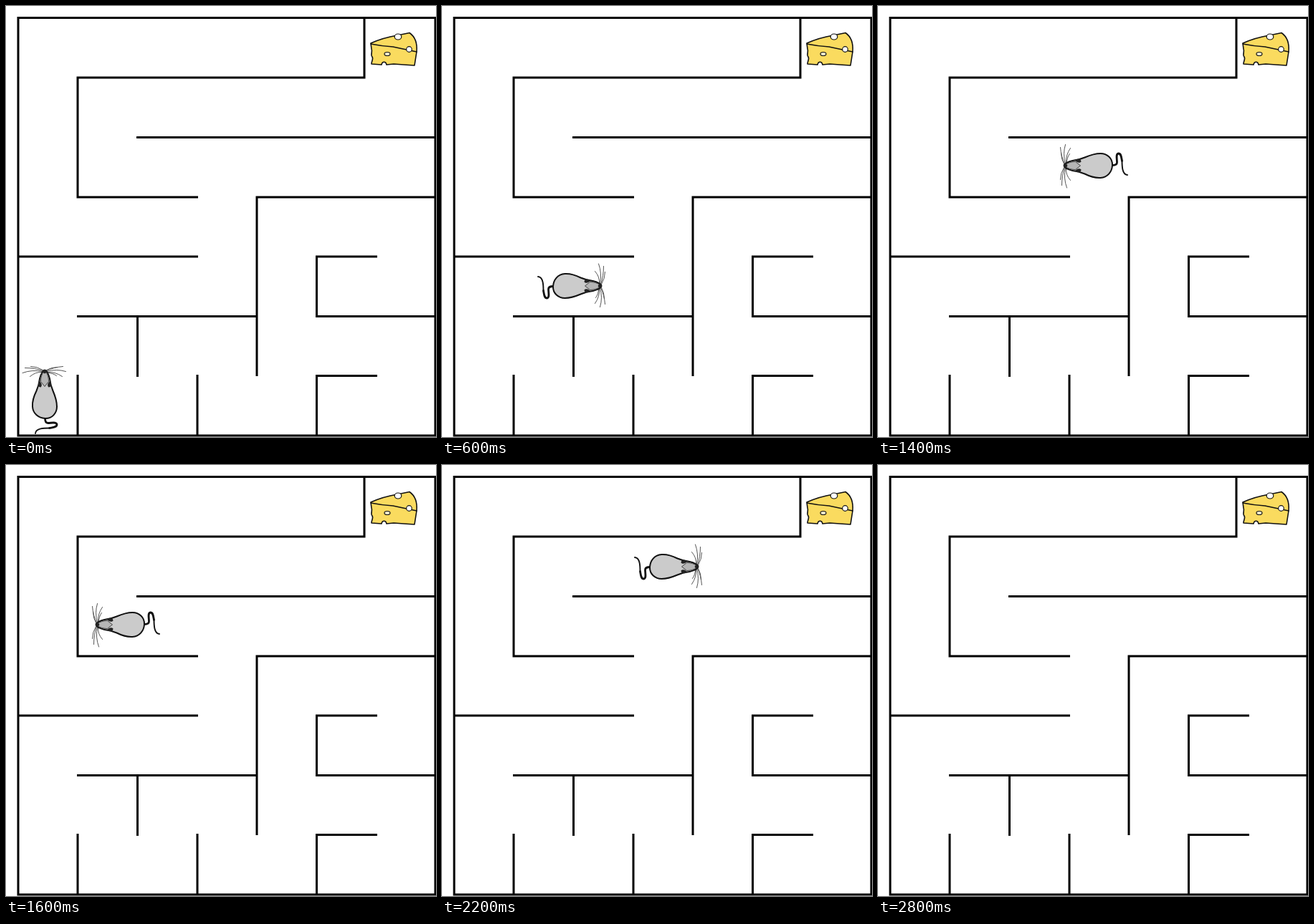
These frames come from a looping animation (600x602 px, 2900 ms). An HTML page with a canvas:

```html
<!DOCTYPE html>
<html lang="en">
<head>
<meta charset="utf-8">
<title>Mouse in a maze</title>
<style>
html, body { margin: 0; width: 100%; height: 100%; overflow: hidden; background: #fff; }
canvas { display: block; }
</style>
</head>
<body>
<canvas id="stage" width="600" height="602"></canvas>
<script>
const ctx = document.getElementById('stage').getContext('2d');
const STEP = 200, LOOP = 2900;
const UP = 0, RIGHT = Math.PI / 2, LEFT = -Math.PI / 2;

// Centre and heading of the mouse at each step; it is gone in the last one.
const poses = [
  [52.5, 550.5, UP], [62.5, 423.5, UP],
  [71.5, 393.5, RIGHT], [180.5, 389.5, RIGHT], [288.5, 389.5, RIGHT],
  [310.5, 371.5, UP], [310.5, 248.5, UP],
  [301.5, 224.5, LEFT], [167.5, 224.5, LEFT],
  [145.5, 157.5, UP],
  [173.5, 140.5, RIGHT], [315.5, 140.5, RIGHT], [458.5, 140.5, RIGHT],
  [545, 127, UP]
];

const walls = new Path2D(`
  M17 16.5H599V600H17Z
  M500 16V100H100V267H268 M182 183.5H599
  M599 267H350V517 M17 350H268
  M518 350H433.5V433.5H599 M99 433.5H350
  M183.5 433V518 M100 515V600 M267 515V600
  M433.5 600V516.5H518`);

const body = new Path2D(`M1.5 -41 C-2 -41 -4 -36 -5.5 -30 C-6 -24 -7 -20 -10 -13
  C-14 -5 -16 2 -15.5 9 C-15 19 -7 25 2 25.5 C12 26 18.5 18 18.5 9
  C18.5 1 16 -6 13 -13 C10 -20 9 -25 8.5 -30 C7 -36 5 -41 1.5 -41Z`);
const head = new Path2D('M1.5 -40 C-2 -39 -4 -32 -4 -26 L1.5 -19 L7 -26 C7 -32 5 -39 1.5 -40Z');
const ears = new Path2D(`M-6 -27 C-9 -22 -8 -18 -4 -18 C-2 -20 -2 -23 -6 -27Z
  M9 -27 C12 -22 11 -18 7 -18 C5 -20 5 -23 9 -27Z`);
const tailBase = new Path2D('M2 25 C2 29 3 32 6 32 C11 32 18 30 18.5 34 C18.5 38 13 38 8 39');
const tailTip = new Path2D('M9 39 C1 39 -11 39 -11.5 46.5');
const whiskers = new Path2D(`
  M-1 -41 Q-12 -45 -26 -45 M-1 -40 Q-16 -43 -29.5 -38
  M-2 -39 Q-11 -40 -19 -33 M-1 -42 Q-9 -47 -18 -47
  M4 -41 Q14 -46 27 -47 M4 -40 Q18 -44 31 -40
  M5 -39 Q16 -40 26 -33 M4 -42 Q11 -46 19 -46
  M5 -38 Q13 -38 18 -34`);
const nose = new Path2D('M-3 -40 Q1.5 -46 6 -40 L1.5 -37Z');

const cheese = new Path2D(`M509 52 C520 47 534 43 546 41 L563 37.5 C571 43 574 53 573 64
  L570 83 L555 82 L541 81 L531 82 C530 77 525 77 524 82 L510 81
  C510 77 513 74 511 71 C508 68 512 64 510 60Z`);
const rind = new Path2D('M509 53 Q524 56 540 57 L573 64');

function stroke(path, width, color = '#111') {
  ctx.lineWidth = width;
  ctx.strokeStyle = color;
  ctx.stroke(path);
}

function fill(path, color) {
  ctx.fillStyle = color;
  ctx.fill(path);
}

function hole(x, y, rx, ry, color) {
  const ring = new Path2D();
  ring.ellipse(x, y, rx, ry, 0, 0, Math.PI * 2);
  fill(ring, color);
  stroke(ring, 1.2);
}

function drawCheese() {
  fill(cheese, '#fadb5f');
  stroke(cheese, 1.6);
  stroke(rind, 1.3);
  hole(547, 43, 4.8, 4, '#fff');
  hole(562.5, 60.5, 3.8, 3.8, '#fff');
  hole(532, 67, 4, 2.5, '#f4efd0');
}

function drawMouse([x, y, angle]) {
  ctx.save();
  ctx.translate(x, y);
  ctx.rotate(angle);
  stroke(whiskers, 1, '#555');
  stroke(tailBase, 2.8);
  stroke(tailTip, 1.9);
  fill(body, '#cbcbcb');
  stroke(body, 2);
  fill(head, '#b5b5b5');
  stroke(head, 1, '#444');
  fill(ears, '#222');
  fill(nose, '#222');
  ctx.restore();
}

function draw(now) {
  const step = Math.floor((now % LOOP) / STEP);
  ctx.fillStyle = '#fff';
  ctx.fillRect(0, 0, 600, 602);
  ctx.lineCap = ctx.lineJoin = 'round';
  drawCheese();
  if (poses[step]) drawMouse(poses[step]);
  ctx.lineCap = 'butt';
  ctx.lineJoin = 'miter';
  stroke(walls, 3, '#000');
}

const start = performance.now();
function tick() {
  draw(performance.now() - start);
  requestAnimationFrame(tick);
}
tick();
</script>
</body>
</html>
```
